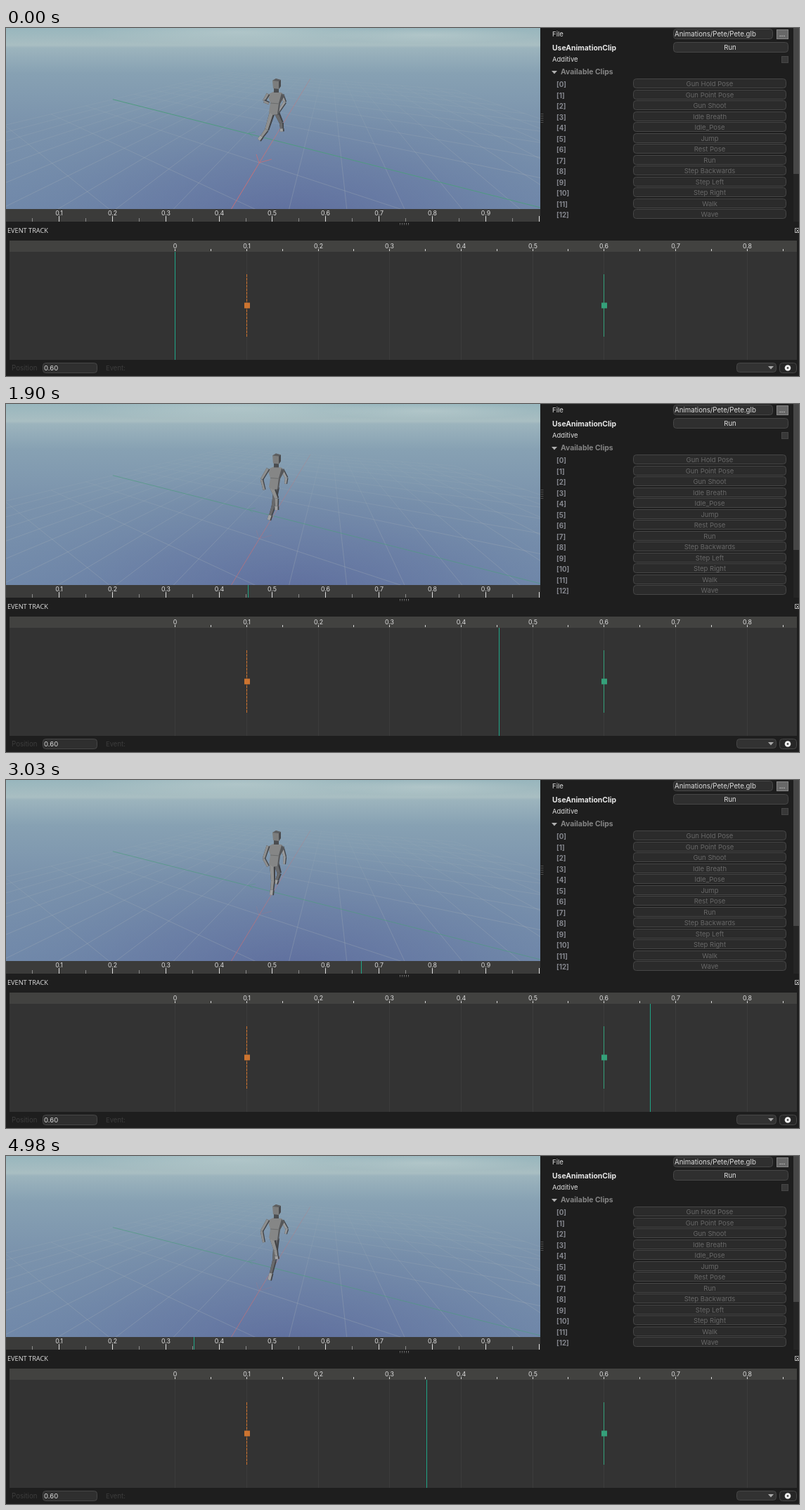
Write an HTML page that moves like this. It is 1128x496 px and loops after 5.41 s.

```html
<!DOCTYPE html>
<html lang="en">
<head>
<meta charset="utf-8">
<title>Event track</title>
<style>
html, body { margin: 0; width: 100%; height: 100%; overflow: hidden; background: #1e1e1e; }
svg { display: block; width: 1128px; height: 496px; font-family: Inter, "Open Sans", sans-serif; }
</style>
</head>
<body>
<svg id="stage" viewBox="0 0 1128 496" xmlns="http://www.w3.org/2000/svg">
  <defs>
    <linearGradient id="air" x1="0" y1="0" x2="0" y2="1">
      <stop offset="0" stop-color="#98b6bd"/>
      <stop offset=".095" stop-color="#a9bec2"/>
      <stop offset=".11" stop-color="#9cb4bd"/>
      <stop offset=".25" stop-color="#87a1b3"/>
      <stop offset=".55" stop-color="#7a92ac"/>
      <stop offset="1" stop-color="#7189aa"/>
    </linearGradient>
    <radialGradient id="deep" gradientUnits="userSpaceOnUse" cx="0" cy="0" r="1" gradientTransform="translate(410 275) scale(450 185)">
      <stop offset="0" stop-color="#586499" stop-opacity=".75"/>
      <stop offset=".5" stop-color="#60709f" stop-opacity=".42"/>
      <stop offset="1" stop-color="#6c84a5" stop-opacity="0"/>
    </radialGradient>
    <radialGradient id="cloud">
      <stop offset="0" stop-color="#c3d2d2" stop-opacity=".5"/>
      <stop offset="1" stop-color="#c3d2d2" stop-opacity="0"/>
    </radialGradient>
    <linearGradient id="gridFade" gradientUnits="userSpaceOnUse" x1="0" y1="60" x2="0" y2="200">
      <stop offset="0" stop-color="#a3b2b9" stop-opacity=".08"/>
      <stop offset="1" stop-color="#a3adb5" stop-opacity=".38"/>
    </linearGradient>
    <linearGradient id="redFade" gradientUnits="userSpaceOnUse" x1="0" y1="72" x2="0" y2="200">
      <stop offset="0" stop-color="#b57f86" stop-opacity=".5"/>
      <stop offset="1" stop-color="#c47078"/>
    </linearGradient>
    <clipPath id="view"><path d="M0 0H760V258H0Z"/></clipPath>
    <clipPath id="track"><path d="M5 319H1125V473H5Z"/></clipPath>
  </defs>
  <g clip-path="url(#view)">
    <path d="M0 0H760V258H0Z" fill="url(#air)"/>
    <ellipse cx="330" cy="6" rx="210" ry="18" fill="url(#cloud)"/>
    <ellipse cx="600" cy="10" rx="150" ry="12" fill="url(#cloud)"/>
    <path d="M0 0H760V258H0Z" fill="url(#deep)"/>
    <g id="grid" fill="none"></g>
    <g id="axes" fill="none"></g>
    <g id="runner"></g>
  </g>
  <g id="ui"></g>
  <path id="topHead" d="M0 258V276" stroke="#1fa587"/>
  <g clip-path="url(#track)"><path id="trackHead" d="M0 319V473" stroke="#1fa587"/></g>
</svg>
<script>
const $ = id => document.getElementById(id);
const LOOP = 5410, STEP = 30;

const rect = (x, y, w, h, fill, extra = '') =>
  `<rect x="${x}" y="${y}" width="${w}" height="${h}" fill="${fill}" ${extra}/>`;
const path = (d, stroke, width = 1, extra = '') =>
  `<path d="${d}" stroke="${stroke}" stroke-width="${width}" ${extra}/>`;
const text = (x, y, s, size, fill, extra = '') =>
  `<text x="${x}" y="${y}" font-size="${size}" fill="${fill}" ${extra}>${s}</text>`;
const MID = 'text-anchor="middle"', BOLD = 'font-weight="700"';
const field = (x, y, w, h, fill = '#2f2f2f', r = 4) =>
  rect(x + .5, y + .5, w - 1, h - 1, fill, `rx="${r}" stroke="#464646"`);

// Centre of the pixel column that holds x, for sharp vertical lines.
const column = x => Math.floor(x) + .5;
const trackX = p => column(240.6 + p * 1017);

// Ground plane in perspective: the origin and two vanishing points.
const ORIGIN = [380, 159.6], FAR_RED = [459.6, 28], FAR_GREEN = [-139, 28];
const K_RED = .198, K_GREEN = .0785, NEAR = .12, EXTENT = 10;

function ground(a, b) {
  const u = a * K_RED, v = b * K_GREEN;
  return [0, 1].map(i => ((ORIGIN[i] + u * FAR_RED[i] + v * FAR_GREEN[i]) / (1 + u + v)).toFixed(1));
}
function redLine(b) {
  const start = Math.max(-EXTENT, (NEAR - 1 - b * K_GREEN) / K_RED);
  return `M${ground(start, b)}L${ground(EXTENT, b)}`;
}
function greenLine(a) {
  const start = Math.max(-EXTENT, (NEAR - 1 - a * K_RED) / K_GREEN);
  return start < EXTENT ? `M${ground(a, start)}L${ground(a, EXTENT)}` : '';
}

function drawFloor() {
  let lines = '';
  for (let n = -EXTENT; n <= EXTENT; n++) if (n) lines += redLine(n) + greenLine(n);
  $('grid').innerHTML = path(lines, 'url(#gridFade)', .9);
  $('axes').innerHTML =
    path(greenLine(0), '#4f9b80') +
    path(redLine(0), 'url(#redFade)') +
    path('M355 148L345 150L351 155', '#4f9b80', 1, 'opacity=".6"') +
    path('M356 180L360 192L378 187', '#c47078', 1, 'id="arrow"');
}

function drawUi() {
  let s = rect(0, 258, 760, 18, '#3b3b3a') + rect(760, 0, 368, 276, '#1e1e1e') + rect(0, 276, 1128, 220, '#1e1e1e');

  for (let n = 1; n <= 20; n++) {
    const x = column(n * 37.98 - .8), major = n % 2 === 0;
    s += path(`M${x} ${major ? 268 : 271}V276`, major ? '#e0e0e0' : '#8b8b8b');
    if (major && n < 20) s += text(x, 266.5, (n / 20).toFixed(1), 8.8, '#dedede', MID);
  }

  s += text(777, 12, 'File', 9.6, '#dedede') + field(949, 1, 142, 15) +
    text(951, 11.5, 'Animations/Pete/Pete.glb', 9.7, '#dedede') +
    rect(1096.5, 2.5, 16, 13, '#686868', 'stroke="#858585"') + text(1104, 12, '...', 10, '#e4e4e4', MID) +
    text(777, 31.5, 'UseAnimationClip', 10.4, '#e6e6e6', BOLD) + field(949, 20, 164, 15) +
    text(1030, 31, 'Run', 9.6, '#dedede', MID) +
    text(777, 48, 'Additive', 9.5, '#dedede') + rect(1103.5, 40.5, 9, 9, '#383838', 'stroke="#464646"') +
    '<path d="M776 61H784L780 65.5Z" fill="#b0b0b0"/>' +
    text(789, 66, 'Available Clips', 10.4, '#858585', BOLD);

  ['Gun Hold Pose', 'Gun Point Pose', 'Gun Shoot', 'Idle Breath', 'Idle_Pose', 'Jump', 'Rest Pose', 'Run',
    'Step Backwards', 'Step Left', 'Step Right', 'Walk', 'Wave'].forEach((clip, i) => {
    const y = Math.round(72 + i * 15.53);
    s += text(783, y + 11.5, `[${i}]`, 9.8, '#85878e', BOLD) + field(892, y, 218, 14, '#2b2b2b') +
      text(1001, y + 10.7, clip, 9.5, '#686868', MID);
  });

  s += rect(1120, 0, 8, 276, '#252525') + rect(1120, 0, 8, 208, '#474747') +
    path('M761.5 122V135M763.5 122V135', '#777', 1, 'stroke-dasharray="1 2"') +
    path('M560 278.5H574M560 280H574', '#8a8a8a', 1, 'stroke-dasharray="1 2"') +
    text(2, 292, 'EVENT TRACK', 9.2, '#e0e0e0', 'font-family="Open Sans, sans-serif"') +
    rect(1122.5, 285.5, 6, 6, 'none', 'stroke="#b0b0b0"') + path('M1124 287L1128 291M1128 287L1124 291', '#b0b0b0') +
    rect(5, 303, 1120, 16, '#424240') + rect(5, 319, 1120, 154, '#333');

  for (let n = 0; n <= 17; n++) {
    const x = trackX(n / 20);
    s += path(`M${x} 315V318`, '#d8d8d8');
    if (n % 2) continue;
    s += path(`M${x} 319V473`, '#3c3c3c') + text(x, 313.8, n ? (n / 20).toFixed(1) : '0', 8.8, '#dedede', MID);
  }

  s += path(`M${trackX(.1)} 351V440`, '#cc7430', 1, 'stroke-dasharray="4 1"') + rect(339, 391.5, 8, 8, '#cc7430') +
    path(`M${trackX(.6)} 351V440`, '#35a07a') + rect(847, 391.5, 8, 8, '#35a07a') +
    text(8, 488, 'Position', 9.7, '#3d3d3d') + field(52, 477, 78, 15) + text(54, 488, '0.60', 9.5, '#dedede') +
    text(142, 488, 'Event:', 9.5, '#3d3d3d') +
    field(1039, 477, 57, 14, '#323232') + '<path d="M1084 482H1092L1088 486.5Z" fill="#aaa"/>' +
    field(1100, 477, 25, 15, '#272727') +
    '<circle cx="1112" cy="484.5" r="4.3" fill="#eee"/><circle cx="1112" cy="484.5" r="1.3" fill="#333"/>';
  $('ui').innerHTML = s;
}

// Each pose: phase, body lift, then x,y of left elbow, hand, right elbow, hand,
// left knee, foot, right knee, foot.
const POSES = [
  [.01, 0, 367, 104, 374, 107, 397, 106, 385, 123, 371, 145, 360, 158, 392, 136, 393, 148],
  [.239, 1, 365, 110, 371, 123, 397, 107, 398, 114, 381, 140, 380, 150, 384, 146, 380, 170],
  [.352, 3, 364, 107, 367, 123, 400, 104, 398, 111, 384, 134, 386, 147, 382, 149, 375, 177],
  [.5, 1, 364, 108, 368, 122, 399, 106, 398, 115, 386, 135, 385, 153, 380, 145, 374, 160],
  [.665, 0, 367, 112, 373, 123, 397, 110, 396, 120, 380, 144, 378, 164, 389, 133, 384, 148],
  [.917, 0, 368, 105, 376, 108, 397, 104, 388, 122, 372, 149, 362, 176, 391, 130, 392, 144]
];

function poseAt(phase) {
  const p = phase < POSES[0][0] ? phase + 1 : phase;
  const i = POSES.findLastIndex(pose => pose[0] <= p);
  const from = POSES[i], to = POSES[(i + 1) % POSES.length];
  const end = to[0] > from[0] ? to[0] : to[0] + 1;
  const k = (p - from[0]) / (end - from[0]);
  return from.map((v, j) => v + (to[j] - v) * k);
}

// A bone is a tapering block with a dark side facing right.
function bone([x0, y0], [x1, y1], w0, w1, light, dark = '#414347') {
  const length = Math.hypot(x1 - x0, y1 - y0) || 1;
  const nx = (y1 - y0) / length / 2, ny = (x0 - x1) / length / 2;
  const block = (a, b, fill) => {
    const edge = (x, y, w) => `${(x + nx * w).toFixed(1)} ${(y + ny * w).toFixed(1)}`;
    return `<path d="M${edge(x0, y0, w0 * a)}L${edge(x1, y1, w1 * a)}L${edge(x1, y1, w1 * b)}L${edge(x0, y0, w0 * b)}Z" fill="${fill}"/>`;
  };
  return block(-1, 1, dark) + block(-1, .4, light);
}

function drawRunner(phase) {
  const q = poseAt(phase), y = -q[1];
  const joint = i => [q[2 + i * 2], q[3 + i * 2]];
  const leg = (hip, knee, foot, light) => {
    const ankle = foot.map((v, i) => v - (v - knee[i]) * .35);
    return bone(hip, knee, 8, 6, light) + bone(knee, ankle, 6, 5, light) + bone(ankle, foot, 6, 6, '#a0a1a2');
  };
  const arm = (shoulder, elbow, hand, light) =>
    bone(shoulder, elbow, 5, 4.5, light) + bone(elbow, hand, 4.5, 4, light);
  $('runner').innerHTML =
    leg([385, 120 + y], joint(6), joint(7), '#68696b') +
    leg([379, 120 + y], joint(4), joint(5), '#8f9090') +
    arm([393, 95 + y], joint(2), joint(3), '#97999b') +
    `<g transform="translate(0 ${y.toFixed(1)})">
      <path d="M372 95L380 91L392 92L396 97L390 108L388 122L380 124L374 120L376 107Z" fill="#858686"/>
      <path d="M392 93L396 97L390 108L388 122L386 123L388 107Z" fill="#55575a"/>
      <path d="M376 107L389 108" stroke="#6b6d6d"/>
      <path d="M381 86H388V92H381Z" fill="#4b4d50"/>
      <path d="M379 75L384 72L391 74V83L388 87L380 86Z" fill="#7c7d7d"/>
      <path d="M379 75L384 72L391 74L388 76Z" fill="#5c5e60"/>
      <path d="M388 76L391 74V83L388 87Z" fill="#494b4e"/>
    </g>` +
    arm([373, 94 + y], joint(0), joint(1), '#8d8e8e');
}

const GROUPS = [1490, 2060, 2620, 3190, 3740, 4290];
const PROGRESS = [[0, .018], [27, .922], [49, 1.665], [66, 2.239], [86, 2.913], [100, 3.3515]];

function phaseAt(t) {
  const g = GROUPS.findLastIndex(start => start <= t);
  if (g < 0) return 0;
  const step = Math.min(100, g * 18 + Math.min(17, Math.floor((t - GROUPS[g]) / STEP)));
  const i = Math.max(1, PROGRESS.findIndex(([s]) => s >= step));
  const [s0, p0] = PROGRESS[i - 1], [s1, p1] = PROGRESS[i];
  return (p0 + (p1 - p0) * (step - s0) / (s1 - s0)) % 1;
}

function render(t) {
  const phase = phaseAt(t), settled = t < 1700;
  drawRunner(phase);
  $('topHead').setAttribute('transform', `translate(${phase ? column(phase * 760) : -2})`);
  $('trackHead').setAttribute('transform', `translate(${trackX(phase)})`);
  $('axes').setAttribute('opacity', settled ? 1 : .7);
  $('arrow').setAttribute('opacity', settled ? .85 : .3);
}

drawFloor();
drawUi();
const began = performance.now();
function tick() {
  render((performance.now() - began) % LOOP);
  requestAnimationFrame(tick);
}
render(0);
requestAnimationFrame(tick);
</script>
</body>
</html>
```
